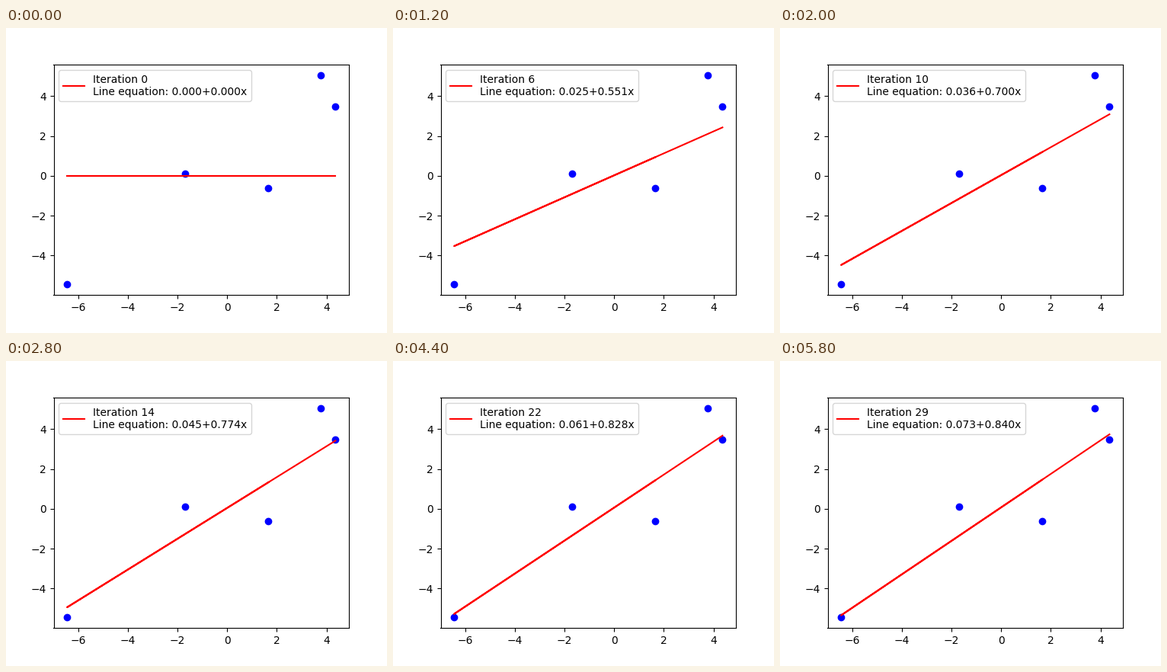
A matplotlib script for the animation above (6 s loop, 500 px wide and 400 px high).

```python
import numpy as np
import matplotlib.pyplot as plt
from matplotlib.animation import FuncAnimation

FRAMES, INTERVAL = 30, 200
RATE = 0.01

x = np.array([1.665, -1.69, -6.455, 3.76, 4.365])
y = np.array([-0.62, 0.108, -5.455, 5.06, 3.466])


def descend(steps):
    """Batch gradient descent for y = a + b*x, starting from zero."""
    a = b = 0.0
    for _ in range(steps):
        error = y - (a + b * x)
        a, b = a + RATE * error.mean(), b + RATE * (error * x).mean()
    return a, b


plt.rcParams["font.family"] = "DejaVu Sans"
fig, ax = plt.subplots(figsize=(5, 4), dpi=100)
fig.subplots_adjust(left=0.125, right=0.9, bottom=0.125, top=0.88)

ax.plot(x, y, "bo")
line, = ax.plot(x, np.zeros_like(x), "r-")
legend = ax.legend([line], ["Iteration 0\nLine equation: 0.000+0.000x"],
                   loc="upper left")
label = legend.get_texts()[0]


def update(i):
    a, b = descend(i)
    line.set_ydata(a + b * x)
    label.set_text(f"Iteration {i}\nLine equation: {a:.3f}+{b:.3f}x")
    return line, legend


anim = FuncAnimation(fig, update, frames=FRAMES, interval=INTERVAL,
                     repeat=True, repeat_delay=0)
plt.show()
```
